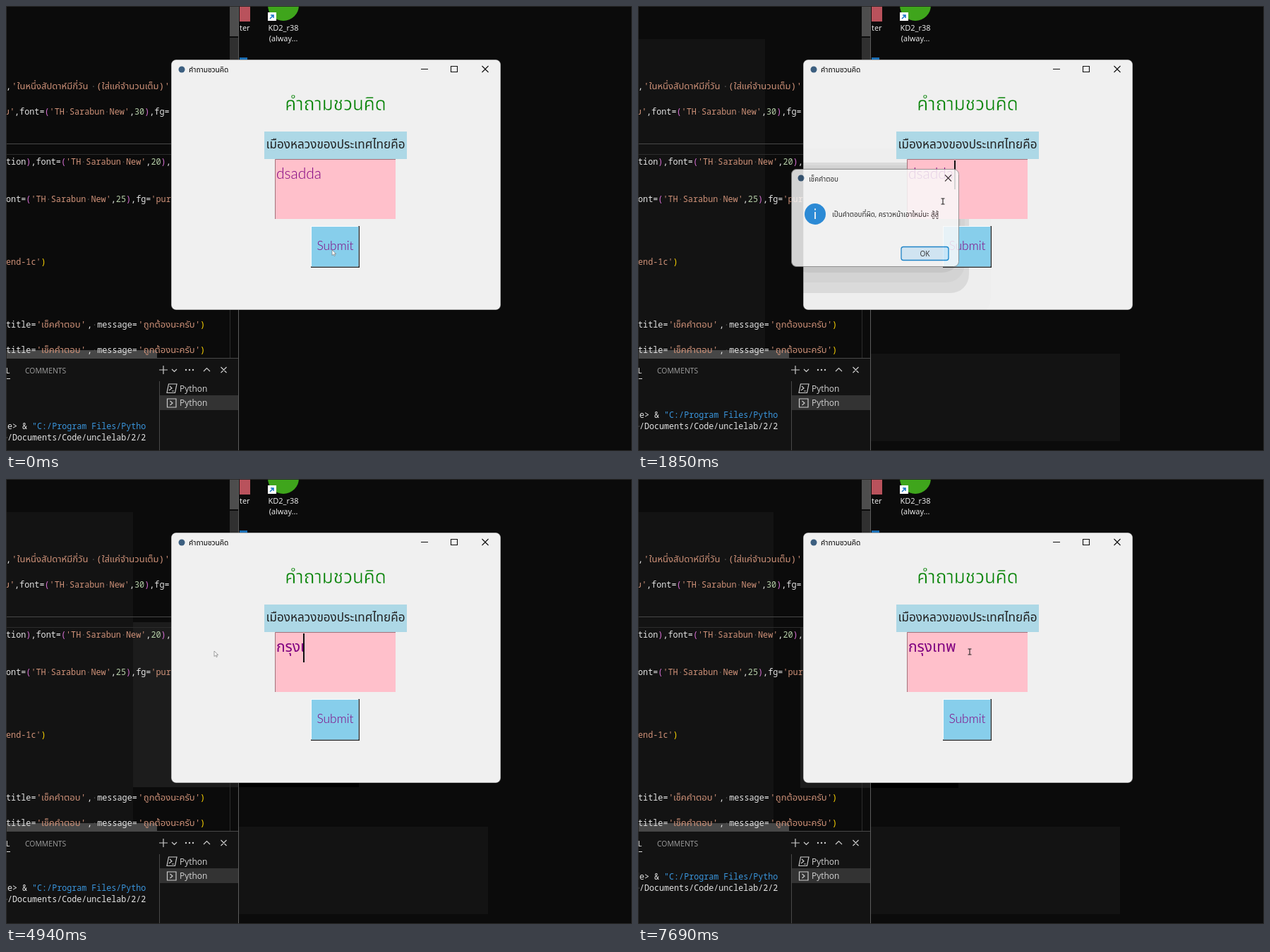
An HTML page for the animation above (8 s loop, 887 by 631 pixels).

```html
<!DOCTYPE html>
<html lang="th">
<head>
<meta charset="utf-8">
<title>Quiz window</title>
<style>
html, body { margin: 0; width: 100%; height: 100%; overflow: hidden; background: #0b0b0b; }
svg { display: block; width: 887px; height: 631px; }
text { font-family: "Open Sans", "Noto Sans Thai Looped", "Noto Sans Thai", "Noto Sans", sans-serif; white-space: pre; }
.code text { font: 11.8px "Noto Sans Mono", "Noto Sans Thai Looped", "Noto Sans Thai", monospace; fill: #e4e4e4; }
.code .thai { font-size: 13px; }
.term text { font-size: 11.7px; }
.code .s { fill: #ce9178; }
.code .p { fill: #da70d6; }
.code .y { fill: #ffd700; }
.code .n { fill: #b5cea8; }
.code .d { fill: #555; }
.code .b { fill: #3a96dd; }
.light text, .light { font-family: Lato, "Noto Sans Thai Looped", "Noto Sans Thai", sans-serif; font-weight: 300; }
.icon { fill: none; stroke: #ccc; stroke-width: 1.2; }
.off { display: none; }
</style>
</head>
<body>
<svg viewBox="0 0 887 631">
  <defs>
    <clipPath id="winClip"><rect x="234" y="76" width="467" height="355" rx="7"/></clipPath>
    <clipPath id="selClip"><rect id="selArea" x="384" y="219" width="65" height="41"/></clipPath>
  </defs>
  <rect width="887" height="631" fill="#0b0b0b"/>
  <g id="patches"></g>

  <!-- desktop -->
  <rect x="331" width="15" height="22" fill="#b9525c"/>
  <circle cx="393" cy="-1" r="22" fill="#3fa51c"/>
  <rect x="371" y="9" width="12" height="12" fill="#fff"/>
  <path d="M374 18l5-5m-4 0h4v4" fill="none" stroke="#1673c4" stroke-width="1.5"/>
  <rect x="331" y="73" width="11" height="8" fill="#1b6fb5"/>
  <g font-size="11" fill="#f2f2f2">
    <text x="331" y="35">ter</text>
    <g text-anchor="middle"><text x="393" y="35">KD2_r38</text><text x="393" y="50">(alway...</text></g>
  </g>

  <!-- editor -->
  <rect x="317" width="13" height="43" fill="#4d4d4d"/>
  <rect x="317" y="45" width="13" height="32" fill="#303030"/>
  <rect y="499" width="329" height="132" fill="#131313"/>
  <path d="M329.5 0V631" stroke="#5c5c5c"/>
  <path d="M317.5 431V499M0 210.5H234" stroke="#2c2c2c"/>
  <path d="M0 195.5H234M0 499.5H329" stroke="#484848"/>
  <rect y="488" width="214" height="11" fill="#474747"/>
  <g class="code">
    <text y="118">,</text>
    <text class="thai s" y="118"><tspan x="8">'ในหนึ่งสัปดาห์มีกี่วัน</tspan><tspan x="120" class="d">·</tspan><tspan x="128">(ใส่แค่จำนวนเต็ม)'</tspan></text>
    <text class="thai s" x="-3" y="154">ม'</text>
    <text x="12" y="154">,font=<tspan class="p">(</tspan><tspan class="s">'TH<tspan class="d">·</tspan>Sarabun<tspan class="d">·</tspan>New'</tspan>,<tspan class="n">30</tspan><tspan class="p">)</tspan>,fg=</text>
    <text x="0" y="225">tion<tspan class="p">)</tspan>,font=<tspan class="p">(</tspan><tspan class="s">'TH<tspan class="d">·</tspan>Sarabun<tspan class="d">·</tspan>New'</tspan>,<tspan class="n">20</tspan><tspan class="p">)</tspan>,</text>
    <text x="0" y="278">ont=<tspan class="p">(</tspan><tspan class="s">'TH<tspan class="d">·</tspan>Sarabun<tspan class="d">·</tspan>New'</tspan>,<tspan class="n">25</tspan><tspan class="p">)</tspan>,fg=<tspan class="s">'pur</tspan></text>
    <text x="0" y="367"><tspan class="s">end-1c'</tspan><tspan class="y">)</tspan></text>
    <g id="boxLine">
      <text y="456">title=</text>
      <text class="thai s" y="456"><tspan x="43">'</tspan><tspan x="50">เช็คคำตอบ'</tspan></text>
      <text x="115" y="456">,<tspan class="d">·</tspan>message=</text>
      <text class="thai s" x="187" y="456">'ถูกต้องนะครับ'</text>
      <text class="y" x="275" y="456">)</text>
    </g>
    <use href="#boxLine" y="35.5"/>
  </g>

  <!-- terminal panel -->
  <g font-size="10.4" fill="#a0a0a0"><text x="0" y="521" fill="#eee">L</text><text x="27" y="521">COMMENTS</text></g>
  <path d="M0 528.5H6" stroke="#ddd"/>
  <path class="icon" d="M217 516H229M223 510V522M235 515l3.5 3.5 3.5-3.5M280 518l4.5-4.5 4.5 4.5M304.5 512l8 8m0-8l-8 8"/>
  <g fill="#ccc"><circle cx="255" cy="516" r="1.2"/><circle cx="260" cy="516" r="1.2"/><circle cx="265" cy="516" r="1.2"/></g>
  <path d="M217.5 532V631" stroke="#484848"/>
  <rect x="218" y="552" width="111" height="21" fill="#333"/>
  <path class="icon" d="M230.5 536H242L239.5 548.5H228ZM232 539l3 3-4 3M235 546h3M228.5 557H241V569H228.5ZM232.5 560l3.5 3-3.5 3"/>
  <g font-size="12" fill="#d4d4d4"><text x="246" y="546.5">Python</text><text x="246" y="567">Python</text></g>
  <g class="code term" id="term">
    <text x="-5" y="600">de&gt; &amp; <tspan class="b">"C:/Program Files/Pytho</tspan></text>
    <text x="-5" y="616">e/Documents/Code/unclelab/2/2</text>
  </g>

  <!-- quiz window -->
  <rect x="234" y="76" width="467" height="355" rx="7" fill="#777"/>
  <rect x="234.5" y="76.5" width="466" height="354" rx="6.5" fill="#f0f0f0"/>
  <g id="shades" clip-path="url(#winClip)"></g>
  <circle cx="249" cy="90" r="4.5" fill="#3c5f80"/>
  <g id="bar">
    <text x="259" y="94" font-size="10.2">คำถามชวนคิด</text>
    <path d="M588 89.5H598M630.5 85.5h9v8h-9ZM674.5 85l9 9m0-9l-9 9" fill="none" stroke="#111" stroke-width="1.1"/>
  </g>
  <text class="light" x="467" y="148" font-size="26" fill="#008000" stroke="#f0f0f0" stroke-width=".5" text-anchor="middle">คำถามชวนคิด</text>
  <rect x="366" y="178" width="202" height="39" fill="#add8e6"/>
  <text x="467" y="202" font-size="17.1" fill="#222" text-anchor="middle">เมืองหลวงของประเทศไทยคือ</text>
  <rect x="381" y="217" width="171" height="85" fill="#ffc0cb"/>
  <path d="M381.5 302V217.5H552" fill="none" stroke="#a4727b"/>
  <g class="light" font-size="21">
    <text id="entry" x="383" y="245" fill="#800080"></text>
    <g id="sel" clip-path="url(#selClip)">
      <rect x="384" y="219" width="65" height="41" fill="#0078d7"/>
      <text x="383" y="245" fill="#fff">dsadda</text>
    </g>
  </g>
  <rect id="caret" y="219" width="2" height="41" fill="#111"/>
  <g id="up">
    <rect x="432" y="312" width="69" height="59" fill="#222"/>
    <rect x="432" y="312" width="67.5" height="57.5" fill="#f7fbfd"/>
    <rect x="433" y="313" width="66.5" height="56.5" fill="#87ceeb"/>
    <text class="light" x="466.5" y="346" font-size="17.4" fill="#800080" text-anchor="middle">Submit</text>
  </g>
  <g id="down">
    <rect x="432" y="312" width="69" height="59" fill="#fff"/>
    <rect x="432.5" y="312.5" width="67" height="57.5" fill="#757575"/>
    <rect x="434.5" y="314.5" width="65" height="55.5" fill="#f0f0f0"/>
    <text class="light" x="467.5" y="347" font-size="17.4" stroke="#000" stroke-width=".25" text-anchor="middle">Submit</text>
  </g>

  <g id="dialogs"></g>
  <path id="arrow" d="M0 0V7.6L1.8 5.9 3.2 8.6 4.4 8 3.2 5.4H5.6Z" fill="#fff" stroke="#666" stroke-width=".6"/>
  <path id="beam" d="M-2.5 -4H2.5M0 -4V4M-2.5 4H2.5" fill="none" stroke="#222" stroke-width="1.1"/>
  <rect x=".5" y=".5" width="886" height="630" fill="none" stroke="#292929"/>
</svg>
<script>
const $ = id => document.getElementById(id);
const show = (id, on) => $(id).classList.toggle('off', !on);
const within = (t, a, b) => t >= a && t < b;
const latest = (keys, t) => keys.filter(k => k[0] <= t).pop();
const box = (x, y, x2, y2, fill) =>
  `<rect x="${x}" y="${y}" width="${x2 - x}" height="${y2 - y}" fill="${fill}"/>`;

// Message boxes: left edge, width, text, and the times of their life
const boxes = [
  { x: 217, w: 238, msg: 'เป็นคำตอบที่ผิด, คราวหน้าเอาใหม่นะ สู้สู้', open: 290, full: 430, hover: 1090, fade: 1850, gone: 2000 },
  { x: 267, w: 139, msg: 'ถูกต้องนะครับ', open: 6250, full: 6370, hover: 7000, fade: 7150, gone: 7300 }
];

$('dialogs').innerHTML = boxes.map(({ x, w, msg }, i) => `<g id="box${i}" transform="translate(${x} 231)">
  <rect x=".5" y=".5" width="${w - 1}" height="138" rx="7" fill="#fafafa" stroke="#888"/>
  <circle cx="14" cy="13" r="4.5" fill="#3c5f80"/>
  <text x="25" y="18" font-size="9.8" fill="#111">เช็คคำตอบ</text>
  <path d="M${w - 20} 8.5l9 9m0-9l-9 9" stroke="#222" stroke-width="1.1"/>
  <circle cx="34" cy="64" r="15" fill="#0f7fd8"/>
  <path d="M34 61V71M34 56.2V58.4" stroke="#fff" stroke-width="1.8"/>
  <text x="58" y="68" font-size="9.8" fill="#111">${msg}</text>
  <rect id="ok${i}" x="${w - 82}" y="110.5" width="67" height="19" rx="3" stroke="#0078c8" stroke-width="1.3"/>
  <text x="${w - 48.5}" y="124" font-size="10" fill="#111" text-anchor="middle">OK</text>
</g>`).join('');

// Stepped drop shadow: reach to the sides, bottom edge, strength
const steps = [[45, 440, .01], [14, 407, .1], [8, 392, .04], [2, 378, .08]];
$('shades').innerHTML = boxes.map(({ x, w }, i) => `<g id="shade${i}">` + steps.map(([r, bottom, a]) =>
  `<rect x="${x - r}" y="${231 - r * .65}" width="${w + 2 * r}" height="${bottom - 231 + r * .65}" rx="26" opacity="${a}"/>`
).join('') + '</g>').join('');

// Faint lighter areas left behind the windows
const corner = box(330, 493, 683, 617, '#131313');
const dim = box(0, 47, 683, 617, '#131313');
const patches = [
  [0, ''],
  [290, dim + box(180, 203, 500, 436, '#191919')],
  [1850, box(0, 47, 180, 499, '#131313') + corner],
  [2000, box(0, 47, 180, 499, '#131313') + box(180, 203, 330, 437, '#1c1c1c') + box(330, 431, 500, 437, '#000') + corner],
  [6250, dim + box(230, 211, 454, 438, '#191919')],
  [7150, box(0, 47, 192, 499, '#131313') + corner],
  [7300, box(0, 47, 192, 499, '#131313') + box(230, 211, 330, 438, '#1c1c1c') + box(330, 431, 454, 438, '#000') + corner]
];

// time, text, caret x
const typing = [
  [0, 'dsadda', 448], [2390, 'dsadda', 383], [3370, 'ก', 396], [3650, 'กร', 405], [3770, 'กรง', 416],
  [4050, 'กรงท', 426], [4300, 'กรง', 416], [4420, 'กร', 405], [4700, 'กรุ', 405],
  [4820, 'กรุง', 416], [4940, 'กรุงเ', 421], [5060, 'กรุงเท', 433], [5180, 'กรุงเทพ', 448]
];
const caretOn = [[150, 2270], [3220, 5460], [7450, 7690]];

// time, x, y, text pointer
const pointer = [
  [0, 462, 346], [430, 467, 318], [700, 455, 301], [850, 448, 318], [970, 430, 338], [1090, 402, 353],
  [1210, 408, 351], [1730, 424, 348], [1850, 432, 277, 1], [2000, 445, 262, 1], [2150, 462, 250, 1],
  [2270, 408, 246, 1], [2390, 303, 247], [2540, 298, 245], [2660, 295, 244], [5710, 322, 246],
  [5860, 380, 283], [6010, 478, 342], [6130, 500, 355], [6490, 480, 346], [6640, 445, 300],
  [6760, 400, 278], [6880, 365, 320], [7000, 353, 346], [7150, 390, 310], [7300, 435, 265, 1],
  [7450, 446, 250, 1], [7570, 462, 247, 1], [7690, 470, 245, 1]
];

let lastPatch;
function draw(t) {
  const patch = latest(patches, t);
  if (patch !== lastPatch) $('patches').innerHTML = (lastPatch = patch)[1];
  $('term').setAttribute('transform', `translate(0 ${t < 290 ? 0 : t < 6250 ? -16 : -32})`);

  const [, text, caretX] = latest(typing, t);
  $('entry').textContent = text;
  $('caret').setAttribute('x', caretX);
  show('caret', caretOn.some(([a, b]) => within(t, a, b)));
  show('sel', within(t, 2270, 3370));
  $('selArea').setAttribute('x', t < 2390 ? 406 : 384);

  const pressed = within(t, 150, 290) || within(t, 6130, 6250);
  show('down', pressed);
  show('up', !pressed);

  boxes.forEach((b, i) => {
    const on = within(t, b.open, b.gone);
    show('box' + i, on);
    show('shade' + i, on);
    $('box' + i).setAttribute('opacity', t < b.full ? .6 : t < b.fade ? 1 : .84);
    $('shade' + i).setAttribute('opacity', t < b.fade ? 1 : .8);
    $('ok' + i).setAttribute('fill', t < b.hover ? '#fdfdfd' : '#d3eafa');
  });
  $('bar').setAttribute('opacity', boxes.some(b => within(t, b.open, b.fade)) ? .5 : 1);

  const [, x, y, beam] = latest(pointer, t);
  show('arrow', !beam);
  show('beam', beam);
  $(beam ? 'beam' : 'arrow').setAttribute('transform', `translate(${x} ${y})`);
}

const start = performance.now();
(function tick() {
  draw((performance.now() - start) % 8000);
  requestAnimationFrame(tick);
})();
</script>
</body>
</html>
```
